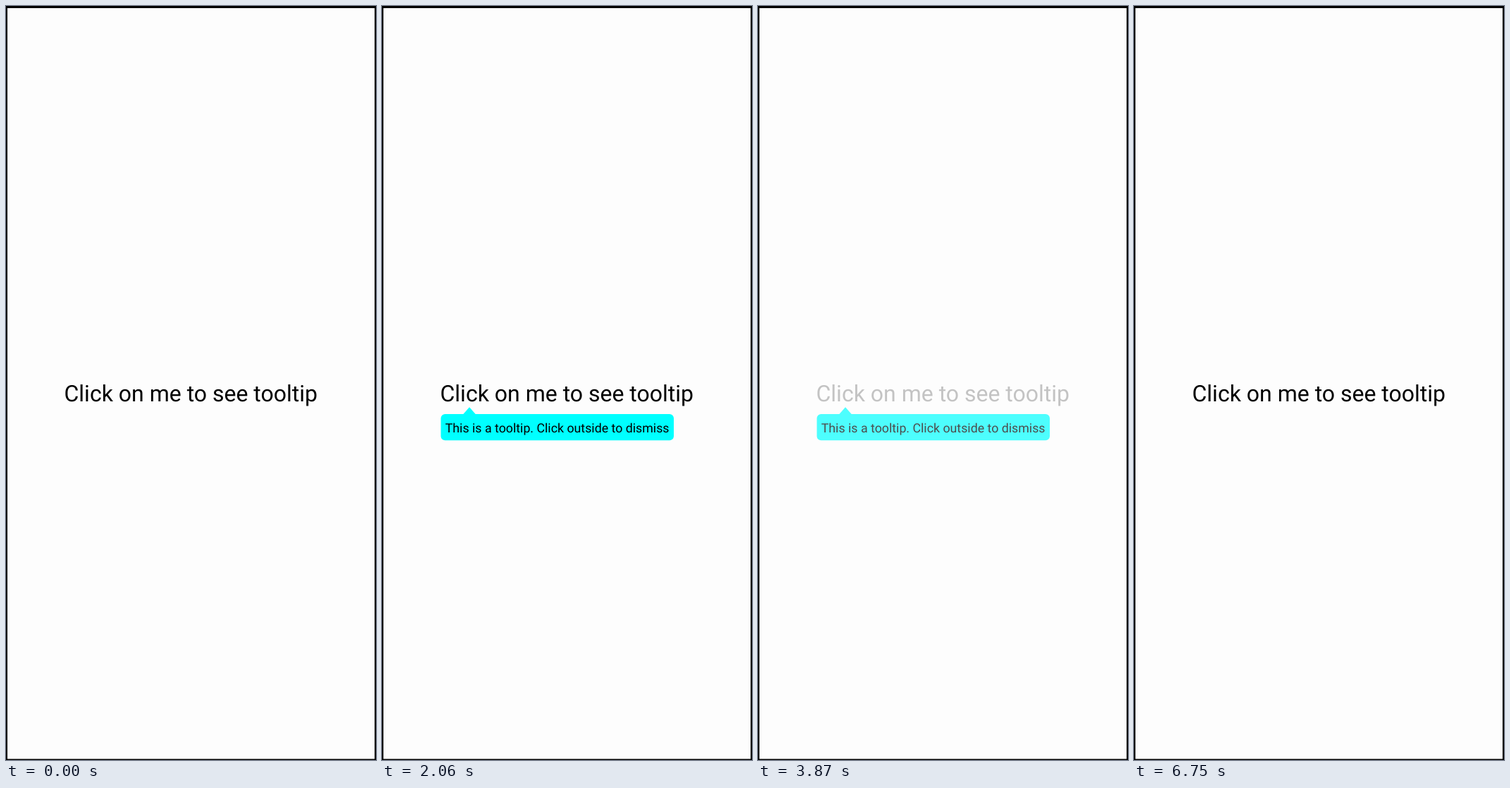
Animation of 525x1068 px, one loop 6.9 s. Source, as an HTML page:

```html
<!DOCTYPE html>
<html lang="en">
<head>
<meta charset="utf-8">
<title>Tooltip demo</title>
<style>
  html, body { margin: 0; width: 100%; height: 100%; overflow: hidden; background: #000; }
  svg { display: block; width: 525px; height: 1068px; }
  text { font-family: Roboto, sans-serif; fill: #000; text-rendering: geometricPrecision; }
  #label { font-size: 32px; }
  #tip text { font-size: 17.8px; }
  #tip { opacity: 0; }
</style>
</head>
<body>
<svg viewBox="0 0 525 1068">
  <rect x="2" y="3" width="521" height="1063.5" fill="#fdfdfd"/>
  <text id="label" x="82.5" y="560">Click on me to see tooltip</text>
  <g id="tip">
    <path d="M114.5 579 L124 568.3 L133.5 579 Z" fill="#0ff"/>
    <rect x="83.5" y="578" width="330.5" height="37.3" rx="6" fill="#0ff"/>
    <text x="89.7" y="604">This is a tooltip. Click outside to dismiss</text>
  </g>
</svg>
<script>
  const LOOP = 6900;
  const PRESSED = 0.2;
  const EASE = 'cubic-bezier(.455,.03,.515,.955)';

  // Each tap: press time and the time the tooltip starts to fade out (ms)
  const taps = [
    { press: 890, dismiss: 3290 },
    { press: 3690, dismiss: 6555 }
  ];

  function play(id, steps) {
    const frames = steps.map(([time, opacity]) => ({ offset: time / LOOP, opacity, easing: EASE }));
    document.getElementById(id).animate(frames, { duration: LOOP, iterations: Infinity });
  }

  const dim = taps.flatMap(({ press }) => [
    [press, 1], [press + 150, PRESSED], [press + 400, 1]
  ]);
  const show = taps.flatMap(({ press, dismiss }) => [
    [press + 60, 0], [press + 260, 1], [dismiss, 1], [dismiss + 190, 0]
  ]);

  play('label', [[0, 1], ...dim, [LOOP, 1]]);
  play('tip', [[0, 0], ...show, [LOOP, 0]]);
</script>
</body>
</html>
```
